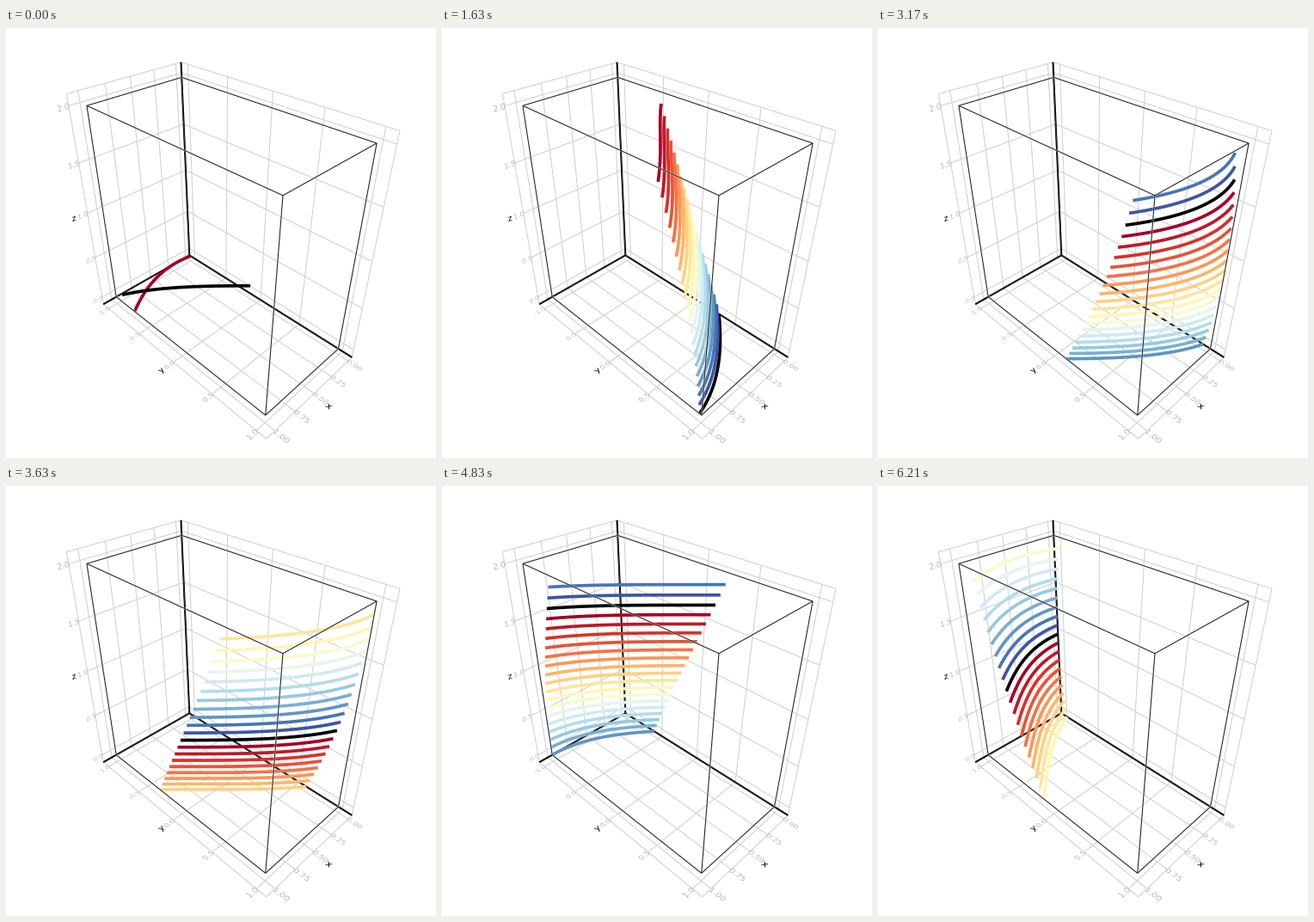
These frames come from a looping animation (500x500 px, 6250 ms). A matplotlib script:

```python
import itertools

import numpy as np
import matplotlib.pyplot as plt
from matplotlib.animation import FuncAnimation
from matplotlib.collections import LineCollection
from matplotlib.patches import PathPatch
from matplotlib.path import Path
from matplotlib.textpath import TextPath

# The wave steps 24 times a second; the screen is redrawn every 25 ms
TICKS_PER_LOOP, LOOP_MS = 250, 6250
TRAIL, STEP = 20, 0.1
PX = 0.72  # points per pixel at 100 dpi

ORIGIN = np.array([0.0, -1.0, 0.0])
END = ORIGIN + [1.156, 2.144, 2.134]
GRID, TICK_TEXT, EDGE = "#d2d2d2", "#b8b8b8", "#262626"

# Camera with a 45 degree view, looking along (-1, -1, -1)
EYE = np.array([3.064, 2.566, 3.484])
FOCAL = 250 / np.tan(np.radians(22.5))
RIGHT = np.array([-1, 1, 0]) / np.sqrt(2)
UP = np.array([-1, -1, 2]) / np.sqrt(6)
FORWARD = np.array([-1, -1, -1]) / np.sqrt(3)


def project(pts):
    rel = np.atleast_2d(pts) - EYE
    scale = FOCAL / (rel @ FORWARD)
    return np.c_[250 + scale * (rel @ RIGHT), 250 - scale * (rel @ UP)]


fig = plt.figure(figsize=(5, 5), dpi=100, facecolor="white")
ax = fig.add_axes([0, 0, 1, 1])
ax.set_xlim(0, 500)
ax.set_ylim(500, 0)
ax.axis("off")


def segments(pairs, color, width, z, **kw):
    lines = [project(pair) for pair in pairs]
    ax.add_collection(LineCollection(lines, colors=color, linewidths=width * PX,
                                     zorder=z, **kw), autolim=False)


def along(point, dim, value):
    moved = np.array(point, float)
    moved[dim] = value
    return moved


def text3d(s, pos, right, up, size, align, color):
    """Lay text flat in the plane spanned by the directions right and up."""
    path = TextPath((0, 0), s, size=10)
    box = path.get_extents()
    anchor = {"left": box.x0, "center": (box.x0 + box.x1) / 2, "right": box.x1}[align]
    flat = (path.vertices - [anchor, (box.y0 + box.y1) / 2]) * size / 10
    pts = np.array(pos) + np.outer(flat[:, 0], right) + np.outer(flat[:, 1], up)
    ax.add_patch(PathPatch(Path(project(pts), path.codes), fc=color, lw=0, zorder=2))


X, Y, Z = np.eye(3)
LABELS = [np.linspace(0, 1, 5), np.linspace(-1, 1, 5), np.linspace(0, 2, 5)]
TICKS = [np.linspace(0.06, 1.055, 5), np.linspace(-0.91, 1.043, 5),
         np.linspace(0.095, 2.04, 5)]

# Grid on the three back planes
grid = []
for dim, run in itertools.permutations(range(3), 2):
    for pos in [*TICKS[dim], END[dim]]:
        a = along(ORIGIN, dim, pos)
        grid.append((a, along(a, run, END[run])))
segments(grid, GRID, 1.1, 1)
segments([(ORIGIN, along(ORIGIN, d, END[d])) for d in range(3)], "black", 2, 2)

# Labels: x and y lie on the floor, z on the left wall
for t, value in zip(TICKS[0], LABELS[0]):
    text3d(f"{value:.2f}", (t, END[1], 0), Y, -X, 0.065, "left", TICK_TEXT)
for t, value in zip(TICKS[1], LABELS[1]):
    text3d(f"{value:.1f}", (END[0], t, 0), -X, -Y, 0.065, "right", TICK_TEXT)
for t, value in zip(TICKS[2], LABELS[2]):
    text3d(f"{value:.1f}", (END[0], -1, t), -X, Z, 0.065, "right", TICK_TEXT)
text3d("x", (0.577, 1.305, 0), Y, -X, 0.078, "center", "black")
text3d("y", (1.29, 0.073, 0), -X, -Y, 0.078, "center", "black")
text3d("z", (1.29, -1, 1.07), -X, Z, 0.078, "center", "black")

# Box edges; those touching the far corner stay behind the curves
corners = np.array(list(itertools.product((0, 1), (-1, 1), (0, 2))), float)
edges = [(p, q) for p, q in itertools.combinations(corners, 2)
         if np.count_nonzero(p != q) == 1]
back = [e for e in edges if np.array_equal(e[0], ORIGIN)]
front = [e for e in edges if not np.array_equal(e[0], ORIGIN)]
segments(back, EDGE, 1.1, 2)
segments(front, "white", 2.4, 5, alpha=0.5)
segments(front, EDGE, 1.1, 6)

COLORS = [plt.get_cmap("RdYlBu")(i / (TRAIL - 1)) for i in range(TRAIL - 1)] + ["black"]
xs = np.linspace(0, 1, 60)
curves = [ax.plot([], [], lw=3.7 * PX, zorder=3 + i / TRAIL,
                  solid_capstyle="butt")[0] for i in range(TRAIL)]


def phase(n):
    """Wave phase of the n-th curve: a quick start, then a steady pace."""
    return np.interp(n, [-1, 0, 20, 149], [3.22, 4.515, 5.82, 11.43])


def draw(tick):
    newest = (6 * tick + 4) // 10
    for age, curve in enumerate(curves):
        n = newest - age
        if n < -1:
            curve.set_data([], [])
            continue
        ys = np.sin(xs + phase(n))
        curve.set_data(*project(np.c_[xs, ys, np.full_like(xs, age * STEP)]).T)
        curve.set_color(COLORS[n % TRAIL])
    return curves


anim = FuncAnimation(fig, draw, frames=TICKS_PER_LOOP,
                     interval=LOOP_MS / TICKS_PER_LOOP,
                     repeat=True, repeat_delay=0, blit=False)
plt.show()
```
